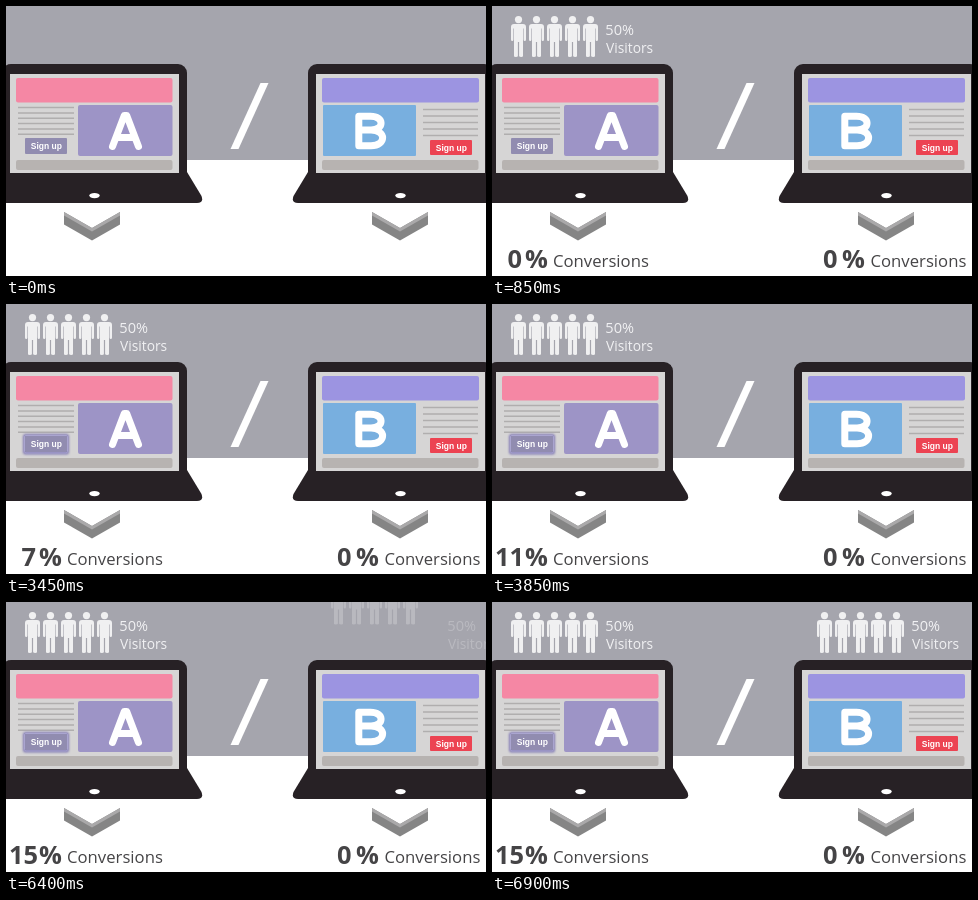
These frames come from a looping animation (480 by 270 pixels, 8 s). An HTML page:

```html
<!DOCTYPE html>
<html lang="en">
<head>
<meta charset="utf-8">
<title>Split test</title>
<style>
  html, body { margin: 0; width: 100%; height: 100%; overflow: hidden; background: #fff; }
  svg { display: block; width: 100vw; height: 100vh; }
  .label { font-family: "Open Sans", "Noto Sans", sans-serif; fill: #f1f1f3; }
  .result { font-family: "Open Sans", "Noto Sans", sans-serif; fill: #454446; }
  .big { font-weight: 700; font-size: 25.4px; }
  .button { font: 700 8.5px "Liberation Sans", Arial, sans-serif; fill: #fff; }
  .letter { fill: none; stroke: #fff; stroke-width: 7; stroke-linecap: round; stroke-linejoin: round; }
</style>
</head>
<body>
<svg viewBox="0 0 480 270">
  <defs>
    <filter id="soft" x="-20%" y="-40%" width="140%" height="180%">
      <feGaussianBlur stdDeviation="0.8"/>
    </filter>
    <g id="person" fill="#f0f0f1">
      <circle cx="7.5" cy="13.6" r="3.6"/>
      <path d="M3 18H12Q15 18 15 21V33.5Q15 35 13.8 35T12.6 33.5V22.5H12V50Q12 51 10.2 51T8.1 50V36H6.9V50Q6.9 51 4.8 51T3 50V22.5H2.4V33.5Q2.4 35 1.2 35T0 33.5V21Q0 18 3 18Z"/>
    </g>
    <g id="laptop">
      <rect x="-4" y="58" width="185" height="125" rx="9" fill="#272125"/>
      <path d="M-4 166H181L195.5 190Q198 197 191 197H-14Q-21 197-18.500 190Z" fill="#272125"/>
      <rect x="4" y="68" width="169" height="99" fill="#d6d5d5"/>
      <rect x="10" y="154" width="156.500" height="10" rx="2" fill="#b7b3b1"/>
      <ellipse cx="88.500" cy="189.600" rx="5.200" ry="2.700" fill="#fff"/>
    </g>
    <g id="chevron">
      <path d="M58 206L86 222L114 206V218.500L86 234.500L58 218.500Z" fill="#858585"/>
      <path d="M58 206L86 222L114 206V209.500L86 225.500L58 209.500Z" fill="#aaa9aa"/>
    </g>
  </defs>

  <rect width="480" height="270" fill="#fff"/>
  <rect width="480" height="154" fill="#a5a5ad"/>
  <path d="M254.500 77H262.500L232.500 143H224.500Z" fill="#fff"/>

  <use href="#laptop"/>
  <rect x="10" y="72" width="156.500" height="24.500" rx="2" fill="#f587a4"/>
  <rect x="72" y="99" width="94.500" height="51" rx="2" fill="#9d94c6"/>
  <path class="letter" d="M106.500 140.500L118.300 109.500H120.700L132.500 140.500M110.500 131.500H128.500"/>
  <path d="M12 101.500H68M12 107H68M12 112.300H68M12 117.600H68M12 122.900H68M12 128.200H68" stroke="#b0aeae" stroke-width="1.500"/>
  <g id="glow">
    <rect x="17" y="130" width="46" height="20.500" rx="2.500" fill="#837cb5" filter="url(#soft)"/>
    <rect x="18.500" y="131.500" width="43" height="17.500" rx="1.500" fill="none" stroke="#aaa5d0"/>
  </g>
  <rect x="19" y="132" width="42" height="16" rx="1" fill="#918cb0"/>
  <text class="button" x="24.800" y="143">Sign up</text>

  <use href="#laptop" x="306"/>
  <rect x="316" y="72" width="157" height="24.500" rx="2" fill="#9c94e1"/>
  <rect x="317" y="99" width="93" height="51" rx="1" fill="#78afdf"/>
  <path class="letter" d="M352.800 110.300H364.500C378.500 110.300 378.500 124 365 124H353M365 124C380.500 124 380.500 139.700 365 139.700H352.800V110.300"/>
  <path d="M417 103.500H472M417 110H472M417 116.500H472M417 123H472M417 129.500H472" stroke="#b0aeae" stroke-width="1.500"/>
  <rect x="424" y="134" width="42" height="15" rx="1" fill="#ec4352"/>
  <text class="button" x="429.800" y="144.500">Sign up</text>

  <use href="#chevron"/>
  <use href="#chevron" x="308"/>

  <g id="results" class="result">
    <text id="count" class="big" y="262"></text>
    <text class="big" x="33" y="262">%</text>
    <text x="61" y="261" font-size="16.700">Conversions</text>
    <text class="big" x="331" y="262">0</text>
    <text class="big" x="350" y="262">%</text>
    <text x="378.500" y="261" font-size="16.700">Conversions</text>
  </g>
  <g id="visitors"></g>
</svg>
<script>
const LOOP = 8000;
const byId = id => document.getElementById(id);

// Each step: time, sideways offset of the label
const groups = [
  { x: 0, drop: 1.3, fade: 38,
    steps: [[50, 34], [200, 28.5], [300, 24], [450, 17], [600, 11], [700, 5], [850, 0]] },
  { x: 306, drop: 1.3, fade: 30,
    steps: [[6400, 22], [6500, 16.5], [6650, 11], [6750, 5.3], [6900, 0]] }
];

byId('visitors').innerHTML = groups.map(({ x }) => {
  const people = [0, 1, 2, 3, 4]
    .map(i => `<use href="#person" x="${x + 19 + i * 18}"/>`).join('');
  return `<g><g>${people}</g><g class="label">
    <text x="${x + 113.3}" y="29" font-size="14.6">50%</text>
    <text x="${x + 114}" y="47" font-size="13.8">Visitors</text></g></g>`;
}).join('');

groups.forEach((group, i) => {
  group.node = byId('visitors').children[i];
  [group.people, group.label] = group.node.children;
});

function slide({ steps, drop, fade, node, people, label }, t) {
  const step = steps.filter(([at]) => at <= t).pop();
  node.style.display = step ? '' : 'none';
  if (!step) return;
  const offset = step[1];
  node.setAttribute('opacity', 1 - offset / fade);
  people.setAttribute('transform', `translate(0 ${-offset * drop})`);
  label.setAttribute('transform', `translate(${offset} 0)`);
}

function draw(t) {
  const count = Math.max(0, Math.min(15, Math.floor((t - 2750) / 100)));
  byId('results').style.display = t < 50 ? 'none' : '';
  byId('count').textContent = count;
  byId('count').setAttribute('x', count > 9 ? 3 : 15.5);
  byId('glow').style.display = count ? '' : 'none';
  groups.forEach(group => slide(group, t));
}

const start = performance.now();
function tick() {
  draw((performance.now() - start) % LOOP);
  requestAnimationFrame(tick);
}
tick();
</script>
</body>
</html>
```
